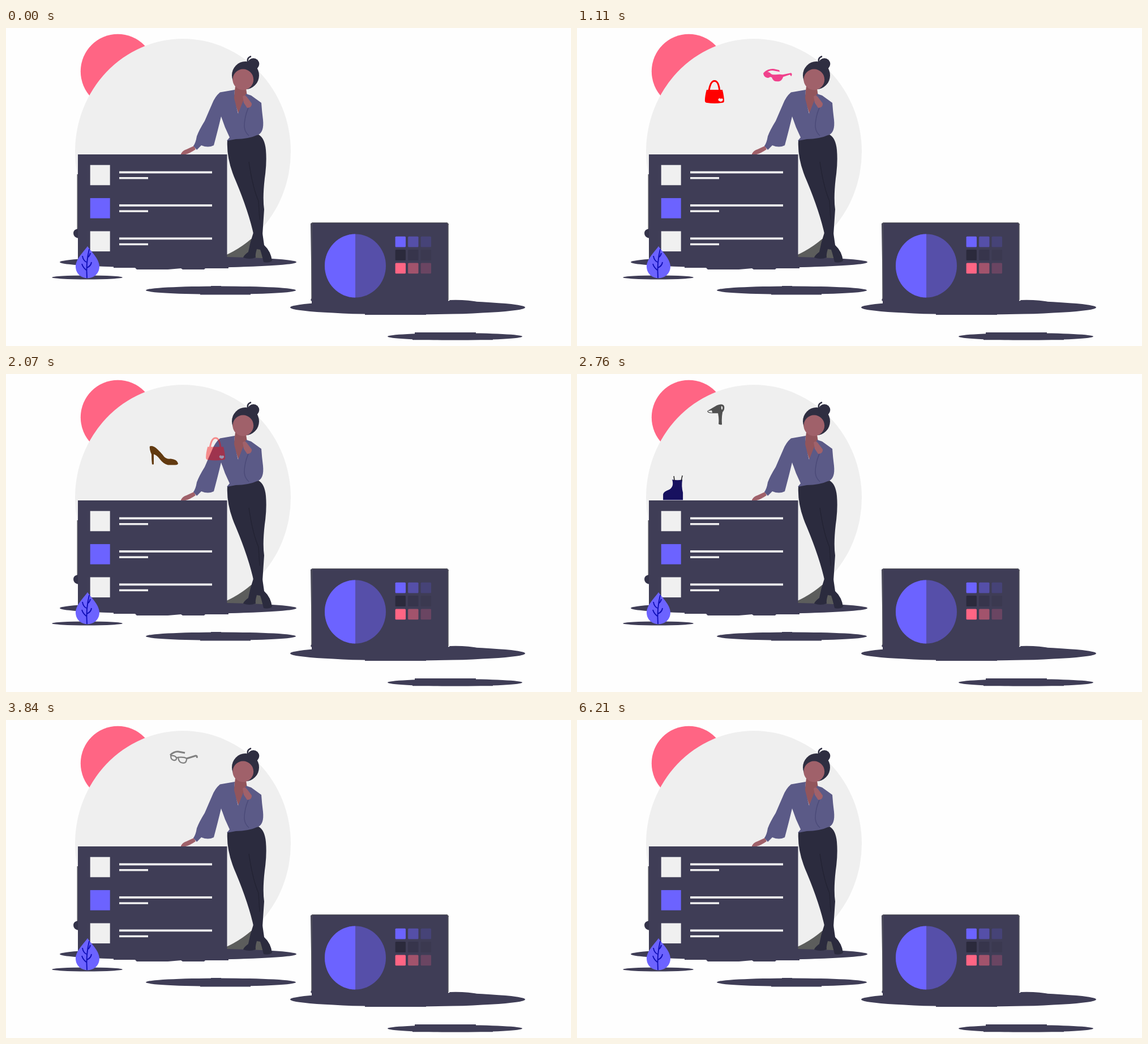
Recreate the animation shown at these times as an HTML page. Size 998 by 561 pixels, loop 6300 ms.

```html
<!DOCTYPE html>
<html lang="en">
<head>
<meta charset="utf-8">
<title>Choosing accessories</title>
<style>
  html, body { margin: 0; width: 100%; height: 100%; overflow: hidden; background: #fefefe; }
  svg { display: block; width: 100vw; height: 100vh; }
</style>
</head>
<body>
<svg viewBox="0 0 998 561" fill="#3f3d56">
  <defs>
    <!-- Accessories: origin at the top centre of each -->
    <g id="sunglasses" fill="#f0418c">
      <path d="M-25 8Q-18 4-13 8Q-10 12-3 11Q5 10 9 11L24 8Q27 10 24 14L22 11L10 15Q8 22 2 23Q-8 24-10 16L-13 15Q-16 18-20 16Q-25 14-25 8Z"/>
      <path d="M-24 7Q-16 0-6 1L3 3L4 6L-7 4Q-15 3-21 9Z"/>
    </g>
    <g id="bag">
      <path d="M-10 19Q-7 1 0 1.5Q7 1 9 19" fill="none" stroke="#f00" stroke-width="3"/>
      <path d="M-14 17H14Q17 29 17 37Q17 40 13 40Q0 42-13 40Q-17 40-17 36Q-17 28-14 17Z" fill="#f00"/>
      <path d="M11 38Q5 36 7 33Q9 31 11 33Q14 31 15 34Q15 37 11 38Z" fill="#f3e9e9"/>
    </g>
    <path id="shoe" fill="#623a10" d="M-25 1Q-20-1-14 4Q-5 12 0 19Q4 24 12 23Q23 24 25 31Q25 34 20 34H7Q-1 32-7 24Q-12 17-18 15L-18 33H-21Q-22 24-22 15Q-26 7-25 1Z"/>
    <g id="dryer">
      <path fill="#505050" d="M-15 12L2 2Q13-2 15 4Q16 10 12 14Q10 24 11 36Q8 37 5 35Q6 26 4 16L-6 16Q-15 16-15 12Z"/>
      <path d="M-14 12L-7 11L-6 15Q-12 15-14 12ZM10 3Q14 5 11 10Q9 8 10 3Z" fill="#e8e8e8"/>
    </g>
    <g id="boot" fill="#17115f">
      <path d="M-2 8Q8 10 16 8Q14 20 17 31V44H-18V34Q-17 29-8 26Q2 21-2 8Z"/>
      <path d="M2 10L1 2M14 10L16 1" stroke="#222" stroke-width="1.5"/>
    </g>
    <g id="glasses" fill="none" stroke="#808080" stroke-width="2.2">
      <path d="M-23 9Q-15 8-13 13Q-13 18-18 17Q-23 16-23 9ZM-10 12Q1 11 5 14Q5 22-1 22Q-9 22-10 12ZM-13 12L-10 13"/>
      <path d="M-24 8Q-17 1-9 2L2 4M5 14L21 9Q24 9 23 13" stroke-width="3"/>
    </g>
    <g id="lipstick" transform="rotate(-48 0 4)">
      <path fill="#e21b1b" d="M-5 0H5V33H-5Z"/>
      <path d="M-5 1H5M-5 4H5" stroke="#f3c6c6"/>
      <path fill="#8d1212" d="M-6 17H6V37H-6Z"/>
    </g>
  </defs>

  <rect width="998" height="561" fill="#fefefe"/>
  <circle cx="197.5" cy="76.5" r="65.7" fill="#ff6584"/>
  <path fill="#5c5d5c" d="M385 372H446L456 385V408H385Z"/>
  <ellipse cx="312.5" cy="218" rx="190.5" ry="199" fill="#efefef"/>

  <!-- Ground shadows -->
  <ellipse cx="304" cy="413" rx="209" ry="10"/>
  <path d="M190 418H420V421L393 422V424L352 424L350 426H312L309 424L286 426H231L228 423H190Z"/>
  <ellipse cx="143.5" cy="440" rx="62.5" ry="3.5"/>
  <ellipse cx="379.5" cy="462.7" rx="132.5" ry="7.2"/>
  <path d="M362 458V455H380V458ZM343 467H432V470.5H343Z"/>
  <ellipse cx="709.5" cy="493" rx="207.5" ry="12.5"/>
  <path d="M780 484L784 480Q815 479 836 484ZM634 503H742V506H634Z"/>
  <ellipse cx="793" cy="544.3" rx="119" ry="6.2"/>
  <path d="M722 541V537H830V541ZM718 546H860V550.3H718Z"/>

  <!-- Woman -->
  <g>
    <ellipse cx="423" cy="83.5" rx="24" ry="24.5" fill="#2f2e41"/>
    <circle cx="437" cy="63.5" r="10.3" fill="#2f2e41"/>
    <path d="M428 62Q424 53 433 50" fill="none" stroke="#2f2e41" stroke-width="2.5"/>
    <path fill="#92555c" d="M405 103L424 107L426 120L411 152L402 126Z"/>
    <circle cx="418.8" cy="91" r="18.4" fill="#a0616a"/>
    <path fill="#a0616a" d="M309 222Q312 216 319 214L332 208L335 214Q325 221 317 223H309Z"/>
    <path fill="#2b2b3e" d="M391 198L446 188Q457 194 459 215Q461 238 457 265Q453 300 456 320L453 365L438 367Q429 325 406 270Q389 232 391 198Z"/>
    <path d="M429 236Q436 283 446 305L448 338" fill="none" stroke="#232333" stroke-width="1.3"/>
    <path fill="#2b2b3e" d="M437 361L453 362L456 383Q468 394 470 411Q464 415 455 413Q452 400 449 391L443 390Q440 400 441 405Q430 409 419 405Q420 401 428 395Q431 378 437 361Z"/>
    <path fill="#5b5a87" d="M378 113.5L404 109L403 124L410 151L424 116L433 119L451 132Q452 147 454 162Q456 183 446 188Q428 196 406 196L390 199L395 193Q386 175 380 156Q373 185 367 207Q357 212 345 207L337 215L331 208Q335 203 337 191Q341 180 351 164Q357 150 364 134Q369 121 378 113.5Z"/>
    <path d="M428 141Q421 157 421 174Q422 184 429 190" fill="none" stroke="#4b4a78" stroke-width="1.5"/>
    <path fill="#a0616a" d="M418 121Q421 117 425 121L434 133Q435 140 426 141L420 132Z"/>
  </g>

  <g id="items"></g>

  <!-- List board -->
  <path d="M126.3 258V356" stroke="#5a5a62" stroke-width="1.6"/>
  <path d="M128 354V371Q119 369 119 362Q119 355 128 354Z" fill="#34334a"/>
  <rect x="127" y="223" width="263.5" height="190"/>
  <g id="rows" fill="#f0f0f0"></g>

  <!-- Leaf -->
  <path fill="#6c63ff" d="M144 385C149 393 165 407 165 421C164 448 124 448 123 421C123 407 139 393 144 385Z"/>
  <path d="M143 441Q141 414 147 390M142 413Q136 410 135 402M143 428Q136 423 134 416M144 405Q148 402 149 397M143 423Q150 420 151 413" fill="none" stroke="#100fb8" stroke-width="1.9"/>

  <!-- Palette panel -->
  <path d="M538 345L541 343H779L782 346L781 348V492H540V482L538 480L540 476Z"/>
  <path d="M540 478V345L542 343.6H779L781 346V480" fill="none" stroke="#56565e" stroke-width="1.4"/>
  <ellipse cx="617" cy="419.5" rx="54" ry="56" fill="#564fa9"/>
  <path fill="#6c63ff" d="M617 363.5A54 56 0 0 0 617 475.5Z"/>
  <g id="swatches"></g>
</svg>
<script>
const LOOP = 6300, STEP = 30, FADE = 290, SHELF = 222;
const SVG = 'http://www.w3.org/2000/svg';
const byId = id => document.getElementById(id);

function add(parent, tag, attrs) {
  const node = document.createElementNS(SVG, tag);
  for (const key in attrs) node.setAttribute(key, attrs[key]);
  return parent.appendChild(node);
}
const box = (parent, x, y, width, height, extra) =>
  add(parent, 'rect', { x, y, width, height, ...extra });

for (let i = 0; i < 3; i++) {
  const y = 241.7 + i * 58.4;
  box(byId('rows'), 148.7, y, 35, 35.6, i === 1 ? { fill: '#6c63ff' } : {});
  box(byId('rows'), 200, y + 11, 164, 3.8);
  box(byId('rows'), 200, y + 21.3, 51, 3.5);
}

['#6c63ff', '#554fa8', '#464377', '#2b2a3c', '#37354c', '#3b3950', '#ff6584', '#a2536c', '#6a4562']
  .forEach((fill, i) => box(byId('swatches'), 687.6 + i % 3 * 22.5, 367.8 + Math.floor(i / 3) * 23.3,
    18.4, 18.8, { fill, rx: 1.5 }));

// Each item rises from behind the board, arcs over and fades near the woman.
const flights = [
  { id: 'sunglasses', start: 260, peak: 960, end: 1500, x: [215, 418], top: 70, land: 85 },
  { id: 'bag', start: 756, peak: 1456, end: 2190, x: [196, 386], top: 50, land: 138 },
  { id: 'shoe', start: 1600, peak: 2230, end: 2740, x: [204.6, 385], top: 120, land: 140 },
  { id: 'dryer', start: 2210, peak: 2910, end: 3500, x: [150, 373], top: 45, land: 85 },
  { id: 'boot', start: 2674, peak: 3374, end: 3830, x: [155, 358], top: 32, land: 60 },
  { id: 'glasses', start: 3090, peak: 3790, end: 4400, x: [199, 400], top: 53.5, land: 120 },
  { id: 'lipstick', start: 4932, peak: 5632, end: 6190, x: [265, 400], top: 50, land: 145 }
].map(flight => ({ ...flight, node: add(byId('items'), 'use', { href: '#' + flight.id }) }));

function draw(time) {
  for (const { node, start, peak, end, x, top, land } of flights) {
    const visible = time > start && time < end;
    node.style.display = visible ? '' : 'none';
    if (!visible) continue;
    const rising = time < peak;
    const fromPeak = (time - peak) / (rising ? peak - start : end - peak);
    const y = top + ((rising ? SHELF : land) - top) * fromPeak ** 2;
    const across = x[0] + (x[1] - x[0]) * (time - start) / (end - start);
    node.setAttribute('transform', `translate(${across} ${y})`);
    node.setAttribute('opacity', Math.min(1, (end - time) / FADE));
  }
}

function tick() {
  const time = performance.now() % LOOP;
  draw(Math.floor(time / STEP) * STEP);
  requestAnimationFrame(tick);
}
tick();
</script>
</body>
</html>
```
